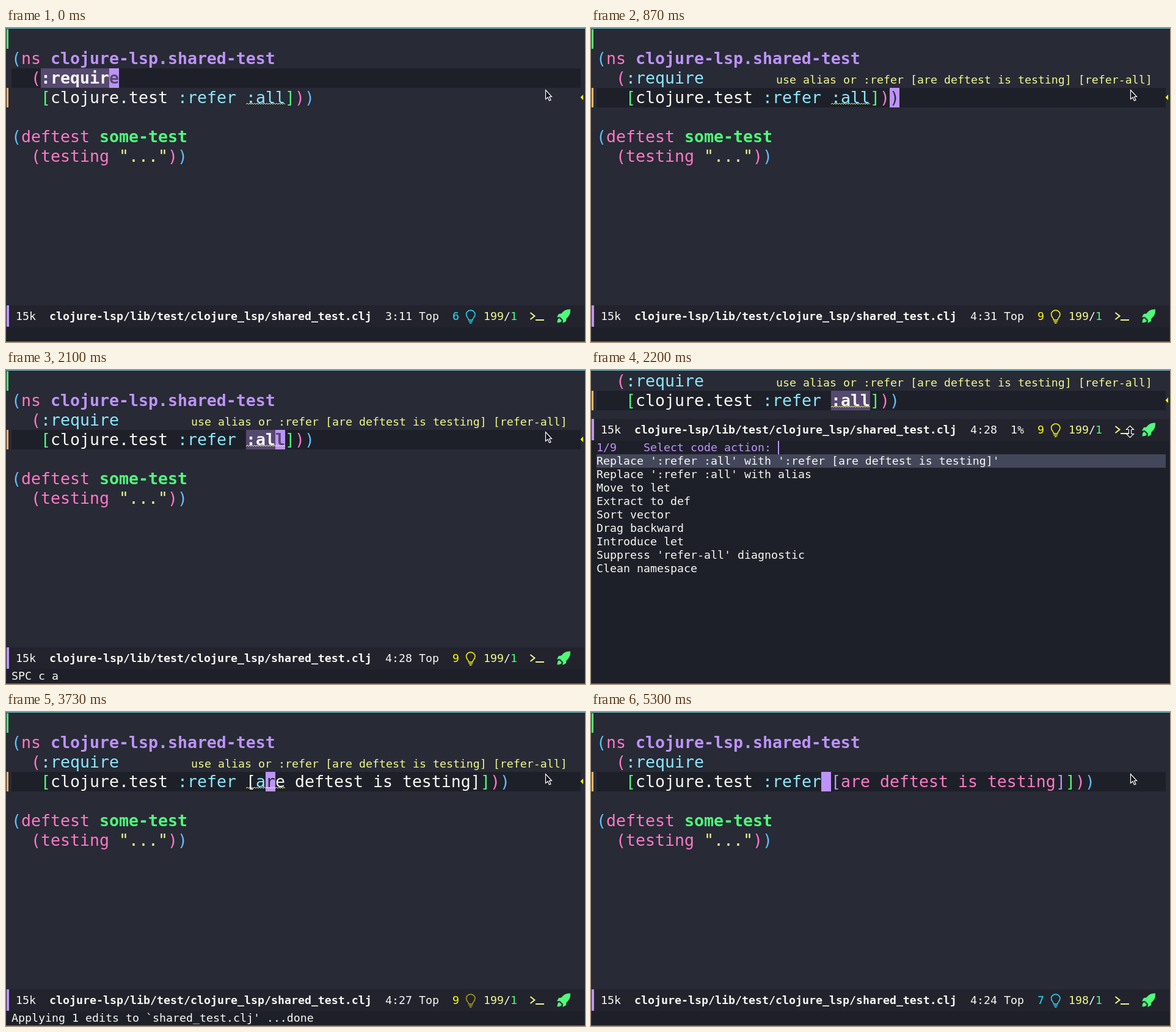
An HTML page with a canvas that plays this animation: 948x514 px, repeating every 6.43 s.

```html
<!DOCTYPE html>
<html lang="en">
<head>
<meta charset="utf-8">
<title>Code action</title>
<style>
html, body { margin: 0; width: 100%; height: 100%; overflow: hidden; background: #282a36; }
canvas { display: block; }
</style>
</head>
<body>
<canvas id="stage" width="948" height="514"></canvas>
<script>
const ctx = document.getElementById('stage').getContext('2d');
const LOOP = 6430;
const CELL = 16, ROW = 32, LEFT = 9, RIGHT = 941;
const CODE = CELL / 0.60205, SMALL = 11 / 0.60205;

const C = {
  bg: '#282a36', dark: '#1e2029', bar: '#22232d', select: '#44475a', region: '#56496f',
  fg: '#f8f8f2', pink: '#ff79c6', purple: '#bd93f9', green: '#50fa7b', cyan: '#8be9fd',
  blue: '#61bfff', yellow: '#f1fa8c', orange: '#ffb86c', red: '#ff5555',
  warn: '#ffff00', warnDim: '#b0a416', info: '#22e0ff'
};

// Lines are lists of [text, colour, bold].
const HEAD = [['[', C.green], ['clojure.test ', C.fg], [':refer ', C.cyan]];
const TAIL = [[']', C.green], [')', C.pink], [')', C.blue]];
const REFER_ALL = [...HEAD, [':all', C.cyan], ...TAIL];
const REFER_RAW = [...HEAD, ['[', C.fg], ['a', C.cyan], ['re deftest is testing]', C.fg], ...TAIL];
const referDone = (close = [']', C.purple]) =>
  [...HEAD, ['[', C.purple], ['are deftest is testing', C.pink], close, ...TAIL];

const ACTIONS = [
  "Replace ':refer :all' with ':refer [are deftest is testing]'",
  "Replace ':refer :all' with alias",
  'Move to let', 'Extract to def', 'Sort vector', 'Drag backward', 'Introduce let',
  "Suppress 'refer-all' diagnostic", 'Clean namespace'
];

// Each step changes only the named parts of the state.
const REQUIRE = { row: 2, col: 3, text: ':require' };
const ALL = { row: 3, col: 24, text: ':all' };
const ARE = { row: 3, col: 25, text: 'are' };
const STEPS = [
  [0, { refer: REFER_ALL, row: 2, col: 10, under: 'e', mark: REQUIRE, count: 6, tint: C.info,
        bulb: C.info, total: 199, hint: false, issue: true, echo: '', menu: false, prompt: 306 }],
  [530, { row: 3 }],
  [600, { mark: null }],
  [670, { hint: true }],
  [730, { mark: { row: 3, col: 4, text: 'clojure.test' }, count: 9, tint: C.warn, bulb: C.warn }],
  [870, { col: 30, under: ')', mark: null }],
  [1800, { col: 27, under: 'l' }],
  [1870, { mark: ALL, echo: 'SPC-' }],
  [2100, { echo: 'SPC c a' }],
  [2200, { menu: true }],
  [3570, { prompt: LEFT }],
  [3730, { menu: false, refer: REFER_RAW, col: 26, under: 'r', mark: null, bulb: C.warnDim,
           echo: "Applying 1 edits to `shared_test.clj' ...done" }],
  [3930, { refer: referDone(), mark: ARE, hint: false, issue: false, count: 7,
           tint: C.info, bulb: C.info, total: 198 }],
  [4670, { col: 25, under: 'a', echo: '' }],
  [5200, { col: 24, under: '[', mark: null, refer: referDone([']', C.red, true]) }],
  [5300, { col: 23, under: ' ', refer: referDone() }]
];

const stateAt = t => Object.assign({}, ...STEPS.filter(s => s[0] <= t).map(s => s[1]));
const colX = col => LEFT + col * CELL;
const rowY = row => 2 + row * ROW;

function box(x, y, w, h, color) {
  ctx.fillStyle = color;
  ctx.fillRect(x, y, w, h);
}

function put(text, x, y, color, size = SMALL, bold = false) {
  ctx.font = `${bold ? 'bold ' : ''}${size}px "DejaVu Sans Mono", monospace`;
  ctx.fillStyle = color;
  ctx.fillText(text, x, y);
}

function codeLine(row, col, tokens) {
  for (const [text, color, bold] of tokens) {
    put(text, colX(col), rowY(row) + 25, color, CODE, bold);
    col += text.length;
  }
}

function shape(path, { fill, stroke, width = 1 }) {
  const p = new Path2D(path);
  if (fill) { ctx.fillStyle = fill; ctx.fill(p); }
  if (stroke) { ctx.strokeStyle = stroke; ctx.lineWidth = width; ctx.stroke(p); }
}

function squiggle(x, y, width) {
  let path = `M${x} ${y + 2}`;
  for (let i = 1; i <= width / 2; i++) path += `L${x + i * 2} ${y + (i % 2 ? 0 : 2)}`;
  shape(path, { stroke: C.yellow });
}

function buffer(s) {
  box(LEFT, rowY(s.row), RIGHT - LEFT, ROW, C.dark);
  box(1, rowY(0), 3, ROW, C.green);
  box(1, rowY(3), 3, ROW, C.orange);
  codeLine(1, 0, [['(', C.blue], ['ns ', C.pink], ['clojure-lsp.shared-test', C.purple, true]]);
  codeLine(2, 2, [['(', C.pink], [':require', C.cyan]]);
  codeLine(3, 3, s.refer);
  codeLine(5, 0, [['(', C.blue], ['deftest ', C.pink], ['some-test', C.green, true]]);
  codeLine(6, 2, [['(', C.pink], ['testing ', C.pink], ['"..."', C.yellow], [')', C.pink], [')', C.blue]]);
  if (s.hint) put('use alias or :refer [are deftest is testing] [refer-all]', 303, rowY(2) + 25, C.yellow);

  const m = s.mark;
  if (m) {
    box(colX(m.col), rowY(m.row), m.text.length * CELL, ROW, C.region);
    codeLine(m.row, m.col, [[m.text, C.fg, true]]);
  }
  if (!s.menu) {
    box(colX(s.col), rowY(s.row), CELL, ROW, C.purple);
    codeLine(s.row, s.col, [[s.under, m ? C.region : C.bg, !!m]]);
  }
  if (s.issue) {
    squiggle(colX(24), rowY(3) + 25, 4 * CELL);
    shape('M940.5 113.5L945 109V118Z', { fill: C.warn });
  }
}

function modeLine(s) {
  box(1, 454, 946, 36, C.bar);
  box(1, 454, 4, 35, C.purple);
  const y = 478;
  put('15k', 16, y, C.fg);
  put('clojure-lsp/lib/test/clojure_lsp/shared_test.clj', 71, y, C.fg, SMALL, true);
  put(`${s.row + 1}:${s.col + 1} ${s.menu ? ' 1%' : 'Top'}`, 621, y, C.fg);
  put(s.count, 731, y, s.tint);
  shape('M757.5 478C757.5 474.5 753.5 473.5 753.5 468.5A7.3 7.3 0 0 1 768 468.5C768 473.5 764 474.5 764 478Z' +
        'M757.5 480.5H764M759 483H762.5', { stroke: s.bulb, width: 1.5 });
  put(s.total, 782, y, C.yellow);
  put('/', 815, y, C.fg);
  put('1', 826, y, C.green);
  shape('M858.5 466L865.5 471.5L858.5 477M867 478H881', { stroke: C.yellow, width: 2 });
  shape('M924 460.5C917 460 912.5 463 909.5 467.5L905 468L902 473.5L907 473L912 478L911.5 483' +
        'L917 480L917.5 475.5C922 472 924.5 467.5 924 460.5Z' +
        'M906 475C903 476 903 479 902.5 482.5C906 482 909 482 910 479Z', { fill: C.green });
}

function menu(s) {
  box(1, 116, 946, 397, C.dark);
  put('1/9', LEFT, 133, C.purple);
  put('Select code action:', 86, 133, C.purple);
  box(s.prompt, 116, 2, 22, C.purple);
  box(LEFT, 138, RIGHT - LEFT, 22, C.select);
  ACTIONS.forEach((text, i) => put(text, LEFT, 155 + i * 22, C.fg));
}

function shifted(dy, paint) {
  ctx.save();
  ctx.translate(0, dy);
  paint();
  ctx.restore();
}

function pointer(resizing) {
  const path = resizing
    ? 'M882.5 91.5L888.5 97.5H884.5V104.5H888.5L882.5 110.5L876.5 104.5H880.5V97.5H876.5Z'
    : 'M883.5 101.5V116.5L887 113.5L889.5 119L892 118L889.5 112.5H893.5Z';
  shape(path, { fill: '#111218', stroke: '#ffffff', width: 1.2 });
}

function draw(t) {
  const s = stateAt(t);
  box(0, 0, 948, 514, C.bg);
  if (s.menu) {
    ctx.save();
    ctx.beginPath();
    ctx.rect(0, 2, 948, 78);
    ctx.clip();
    shifted(-2 * ROW, () => buffer(s));
    ctx.restore();
    shifted(-374, () => modeLine(s));
    menu(s);
  } else {
    buffer(s);
    modeLine(s);
    box(1, 490, 946, 23, C.dark);
    put(s.echo, LEFT, 507, C.fg);
  }
  box(0, 0, 948, 1, '#78c3d4');
  box(0, 513, 948, 1, '#6b707c');
  pointer(s.menu);
}

const start = performance.now();
function tick() {
  draw((performance.now() - start) % LOOP);
  requestAnimationFrame(tick);
}
tick();
</script>
</body>
</html>
```
